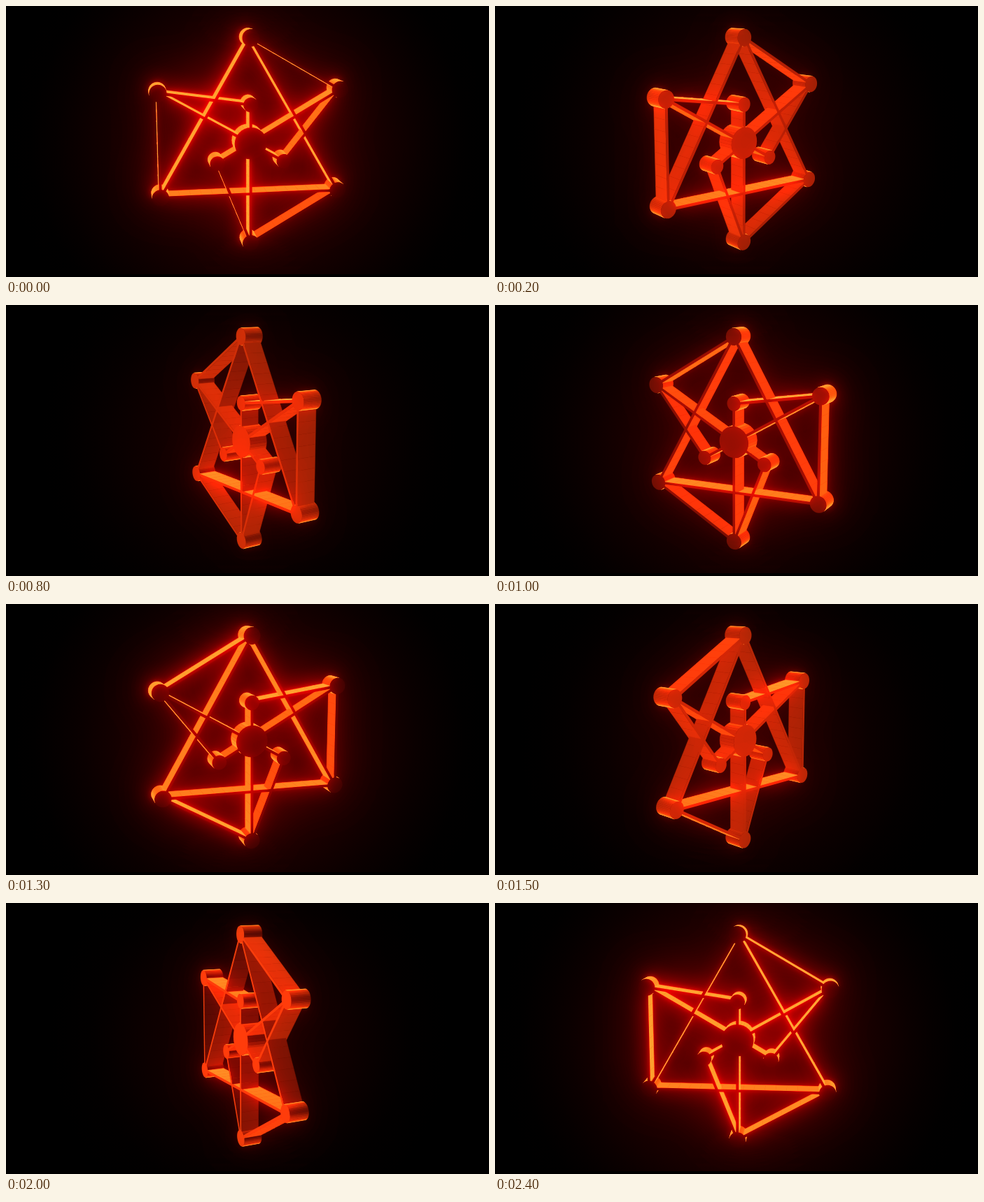
Animation of 690x388 px, one loop 2500 ms. Source, as an HTML page with a canvas:

```html
<!DOCTYPE html>
<html lang="en">
<head>
<meta charset="utf-8">
<title>Spinning network</title>
<style>
  html, body { margin: 0; width: 690px; height: 388px; overflow: hidden; background: #000; }
  canvas { display: block; }
</style>
</head>
<body>
<canvas id="stage" width="690" height="388"></canvas>
<script>
const W = 690, H = 388, CX = 347.5, CY = 194;
const LOOP = 2500, STEP = 100;
const CAMERA = 1020, PITCH = 0.205, START = 9.2;   // START in degrees
const HALF = 14, BAR = 2;                          // half depth, half bar width

const canvas = document.getElementById('stage');
const ctx = canvas.getContext('2d');
const makeLayer = () => Object.assign(document.createElement('canvas'), { width: W, height: H });
const glowLayer = makeLayer();
const glow = glowLayer.getContext('2d');

// Nodes: outer hexagon, inner triangle, hub
const ring = (count, dist, r) => Array.from({ length: count }, (_, i) => {
  const a = i * 2 * Math.PI / count;
  return { x: dist * Math.sin(a), y: -dist * Math.cos(a), r };
});
const nodes = [...ring(6, 148, 12), ...ring(3, 55, 10.5), { x: 0, y: 0, r: 23 }];
const links = '04 02 42 01 56 59 54 69 91 17 97 98 93 83 32'.split(' ');

// Flat face outlines and the side walls that stand on them
const faces = [], walls = [];
const addWall = (a, b, nx, ny, isBar) => walls.push({ a, b, nx, ny, isBar });

for (const { x, y, r } of nodes) {
  const n = 32, at = i => {
    const a = i * 2 * Math.PI / n;
    return [x + r * Math.cos(a), y + r * Math.sin(a)];
  };
  faces.push(Array.from({ length: n }, (_, i) => at(i)));
  for (let i = 0; i < n; i++) {
    const mid = (i + 0.5) * 2 * Math.PI / n;
    addWall(at(i), at(i + 1), Math.cos(mid), Math.sin(mid), false);
  }
}
for (const [i, j] of links) {
  const a = nodes[i], b = nodes[j];
  const len = Math.hypot(b.x - a.x, b.y - a.y);
  const ux = (b.x - a.x) / len, uy = (b.y - a.y) / len;
  const from = a.r * 0.92, to = len - b.r * 0.92;
  const at = (d, side) => [a.x + ux * d - uy * side * BAR, a.y + uy * d + ux * side * BAR];
  faces.push([at(from, 1), at(to, 1), at(to, -1), at(from, -1)]);
  const parts = Math.ceil((to - from) / 16), size = (to - from) / parts;
  for (const side of [1, -1])
    for (let k = 0; k < parts; k++)
      addWall(at(from + k * size, side), at(from + (k + 1) * size, side), -uy * side, ux * side, true);
}

// Surface colour by how directly it looks at the camera, before the glow is added
const ramp = [
  [0, 255, 180, 60], [0.22, 255, 158, 44], [0.32, 235, 98, 16], [0.42, 195, 62, 11], [0.56, 165, 44, 7],
  [0.75, 132, 34, 5], [0.85, 85, 18, 3], [0.91, 36, 7, 2], [0.95, 6, 0, 0], [1, 0, 0, 0]
];
function shade(f) {
  f = Math.min(1, Math.max(0, f));
  const i = Math.max(1, ramp.findIndex(s => s[0] >= f));
  const lo = ramp[i - 1], hi = ramp[i], k = (f - lo[0]) / (hi[0] - lo[0]);
  return `rgb(${[1, 2, 3].map(c => Math.round(lo[c] + (hi[c] - lo[c]) * k))})`;
}
const heat = f => `rgb(${Math.round(255 / (1 + (f / 0.26) ** 4))},0,0)`;

const cosP = Math.cos(PITCH), sinP = Math.sin(PITCH);
let cosT, sinT;
function turn(x, y, z) {
  const depth = z * cosT - x * sinT;
  return [x * cosT + z * sinT, y * cosP + depth * sinP, depth * cosP - y * sinP];
}
function project(x, y, z) {
  const [px, py, d] = turn(x, y, z), k = CAMERA / (CAMERA - d);
  return [CX + px * k, CY + py * k];
}
function facing(normal, [x, y, d]) {
  const vz = CAMERA - d;
  return (normal[2] * vz - normal[0] * x - normal[1] * y) / Math.hypot(x, y, vz);
}

function polygon(points, f, outline) {
  for (const [c, color] of [[ctx, shade(f)], [glow, heat(f)]]) {
    c.beginPath();
    points.forEach(p => c.lineTo(p[0], p[1]));
    c.closePath();
    c.fillStyle = c.strokeStyle = color;
    c.fill();
    if (outline) c.stroke();
  }
}

// Light scattered over the whole picture, in front of the object too
function addGlow() {
  ctx.globalCompositeOperation = 'lighter';
  const open = Math.abs(cosT), peak = 22 + 32 * open ** 3;
  const halo = ctx.createRadialGradient(CX, CY, 0, CX, CY, 235 + 110 * open);
  for (let i = 0; i <= 10; i++) {
    const fall = 0.5 + 0.5 * Math.cos(Math.PI * i / 10);
    halo.addColorStop(i / 10, `rgb(${Math.round(peak * fall)},0,0)`);
  }
  ctx.fillStyle = halo;
  ctx.fillRect(0, 0, W, H);
  for (const [radius, gain] of [[4, 0.7], [13, 1.5], [34, 2]]) {
    ctx.filter = `blur(${radius}px) brightness(${gain})`;
    ctx.drawImage(glowLayer, 0, 0);
  }
  ctx.filter = 'none';
  ctx.globalCompositeOperation = 'source-over';
}

function draw(time) {
  const angle = (START + 360 * time / LOOP) * Math.PI / 180;
  cosT = Math.cos(angle);
  sinT = Math.sin(angle);
  for (const c of [ctx, glow]) {
    c.lineWidth = 0.5;
    c.fillStyle = '#000';
    c.fillRect(0, 0, W, H);
  }

  const visible = [];
  for (const { a, b, nx, ny, isBar } of walls) {
    const mid = turn((a[0] + b[0]) / 2, (a[1] + b[1]) / 2, 0);
    const f = facing(turn(nx, ny, 0), mid);
    if (f <= 0) continue;
    const far = Math.hypot(mid[0], mid[1], CAMERA - mid[2]);
    const shadow = isBar ? 0.35 * Math.max(0, ny) * Math.abs(sinT) : 0;
    visible.push({ a, b, far, f: f + shadow });
  }
  visible.sort((p, q) => q.far - p.far);
  for (const { a, b, f } of visible)
    polygon([project(...a, HALF), project(...b, HALF), project(...b, -HALF), project(...a, -HALF)], f, true);

  // The near face always covers the walls behind it
  const side = facing(turn(0, 0, 1), turn(0, 0, HALF)) > 0 ? 1 : -1;
  const f = facing(turn(0, 0, side), turn(0, 0, side * HALF));
  if (f > 0)
    for (const face of faces) polygon(face.map(p => project(...p, side * HALF)), f, false);

  addGlow();
  ctx.fillStyle = '#000';
  ctx.fillRect(0, H - 4, W, 4);
}

const begin = performance.now();
let last = -1;
function tick() {
  const step = Math.floor((performance.now() - begin) % LOOP / STEP);
  if (step !== last) draw((last = step) * STEP);
  requestAnimationFrame(tick);
}
tick();
</script>
</body>
</html>
```
